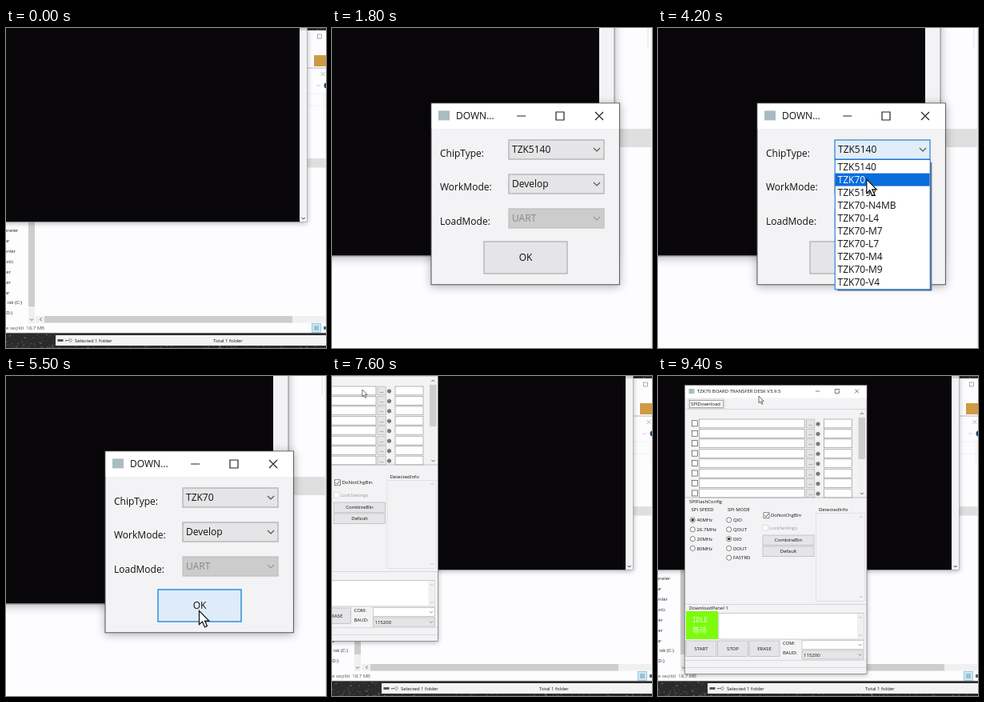
An HTML page for the animation above (9.5 s loop, 400 by 400 pixels).

```html
<!DOCTYPE html>
<html lang="en">
<head>
<meta charset="utf-8">
<title>Flash tool setup</title>
<style>
html, body { margin: 0; width: 100%; height: 100%; overflow: hidden; background: #fdfcff; }
svg { display: block; width: 100vw; height: 100vh; }
text { font: 6px "Open Sans", "Noto Sans", sans-serif; white-space: pre; }
.shadow { filter: drop-shadow(.5px 1px 3px rgba(0, 0, 0, .3)); }
.status { font: 8px "DejaVu Sans Mono", monospace; }
.status-cjk { font: 9px "Noto Sans CJK SC", "Noto Sans CJK", sans-serif; }
</style>
</head>
<body>
<svg id="stage" viewBox="0 0 400 400"></svg>
<script>
const LOOP = 9500, STEP = 100;
const FACE = "#f3f2f4", BUTTON = "#e5e4e6", BLUE = "#0a6cdc";
const stage = document.getElementById("stage");

// Drawing helpers, all returning SVG markup
const rect = (x, y, w, h, fill, stroke = "none", line = .6) =>
  `<rect x="${x}" y="${y}" width="${w}" height="${h}" fill="${fill}" stroke="${stroke}" stroke-width="${line}"/>`;
const label = (x, y, text, fill = "#111", anchor = "start", style = "") =>
  `<text x="${x}" y="${y + 2.1}" fill="${fill}" text-anchor="${anchor}" class="${style}">${text}</text>`;
const path = (d, stroke = "#333", line = .7, fill = "none") =>
  `<path d="${d}" stroke="${stroke}" stroke-width="${line}" fill="${fill}"/>`;
const circle = (x, y, r, fill, stroke = "none", line = .6) =>
  `<circle cx="${x}" cy="${y}" r="${r}" fill="${fill}" stroke="${stroke}" stroke-width="${line}"/>`;
const chevron = (x, y, dir = 1, color = "#444", line = .8) =>
  path(`M${x - 2} ${y - dir}l2 ${2 * dir}l2 ${-2 * dir}`, color, line);
const group = (content, attributes) => `<g ${attributes}>${content}</g>`;
const repeat = (n, fn) => Array.from({ length: n }, (_, i) => fn(i)).join("");

const button = (x, y, w, h, text, hot = false) =>
  rect(x, y, w, h, hot ? "#deecfa" : BUTTON, hot ? "#0078d7" : "#adadad") +
  label(x + w / 2, y + h / 2, text, "#111", "middle");

const combo = (x, y, w, h, text, { fill = BUTTON, stroke = "#adadad", ink = "#111" } = {}) =>
  rect(x, y, w, h, fill, stroke) + label(x + 2, y + h / 2, text, ink) +
  chevron(x + w - 4.5, y + h / 2, 1, ink === "#111" ? "#555" : "#999", .6);

const windowButtons = (min, max, close, y) => path(
  `M${min - 2.7} ${y}h5.5M${max - 2.6} ${y - 2.5}h5v5h-5zM${close - 2.5} ${y - 2.5}l5 5m0 -5l-5 5`, "#222", .6);

const checkbox = (x, y, size, checked, color = "#333") =>
  rect(x, y, size, size, "#fff", color) +
  (checked ? path(`M${x + 1.3} ${y + size / 2}l1.8 1.9l2.8 -4`, color, .8) : "");

const radios = (x, names, chosen) => names.map((name, i) => {
  const y = 180 + i * 11.8;
  return circle(x, y, 3.1, "#fff", "#333") + (i === chosen ? circle(x, y, 1.7, "#222") : "") +
    label(x + 5.3, y, name);
}).join("");

// Motion helpers
const clamp = p => Math.min(1, Math.max(0, p));
const span = (t, from, to) => clamp((t - from) / (to - from));
const smooth = p => p * p * (3 - 2 * p);
const easeOut = p => 1 - (1 - p) ** 3;

function track(keys, t) {
  const next = keys.findIndex(key => key[0] > t);
  if (next === 0) return keys[0].slice(1);
  if (next < 0) return keys.at(-1).slice(1);
  const [t0, x0, y0] = keys[next - 1], [t1, x1, y1] = keys[next];
  const p = easeOut((t - t0) / (t1 - t0));
  return [x0 + (x1 - x0) * p, y0 + (y1 - y0) * p];
}

function stone() {
  let seed = 7;
  const random = () => (seed = seed * 16807 % 2147483647) / 2147483647;
  const streak = (x, y) => {
    const v = 30 + random() * 110 | 0;
    return path(`M${x} ${y}l${random() * 4 - 1} ${random() * 4 - 2}`, `rgb(${v},${v},${v})`, .8);
  };
  return rect(0, 0, 400, 400, "#2b2b2b") +
    repeat(70, () => streak(random() * 62, 381 + random() * 19)) +
    repeat(100, () => streak(random() * 400, 397 + random() * 3)) +
    repeat(12, () => streak(376 + random() * 24, random() * 3));
}

function desktop() {
  const places = [["sneler", 15.5], ["ar", 4.5], ["enler", 12], ["stü", 9], ["er", 6], ["er", 6],
    ["ar", 4.5], ["isk (C:)", 20], ["D:)", 8]];
  const backWindow =
    rect(376, 3, 24, 47, "#fdfcff") + rect(389.3, 8, 5, 5, "none", "#777") +
    rect(385, 34, 15, 14, "#cf9a45");
  const explorer =
    rect(0, 50, 400, 331, "#fdfcff") + path("M376 50H400", "#999") +
    path("M393.5 55l5 5m0 -5l-5 5", "#888", .6) +
    chevron(390.5, 72, 1, "#d8a0a0", .7) + circle(401, 72, 3.5, "#174a70") +
    path("M376 82H400M376 97H400M397.5 82V113", "#e4e2e5", .5) +
    rect(376, 163, 24, 11.5, "#e0dfe0") +
    path("M399.6 80V360", "#e8e8d8", .6) +
    label(7, 240, "ay", "#222", "end") +
    places.map(([name, end], i) => label(end, 253 + i * 12.9, name, "#222", "end")).join("") +
    rect(28, 240, 8, 129, "#f0f0f0") + rect(28, 240, 8, 108, "#cdcdcd") + chevron(32, 364.5) +
    rect(37, 360, 363, 8.5, "#f0f0f0") + rect(48, 360, 310, 8.5, "#cdcdcd") +
    path("M44.5 362.2l-2 2l2 2", "#444", .8) +
    label(0, 375, "e seçildi  18,7 MB", "#555") +
    rect(382.5, 369.5, 11, 11, "#cce8f5", "#67b3d6") +
    path("M385 373h6M385 375h6M385 377h6", "#4d7585", .7) +
    rect(397, 373, 3, 4, "#52636d") + path("M0 381.3H400", "#aaa", .6);
  const statusBar =
    rect(62, 384, 338, 13, FACE) + rect(64.5, 389, 7, 3, "#555") +
    path("M74 390.5h5M75 390.5v1.5", "#777", 1) + circle(80.5, 390.5, 1.8, "none", "#777", .8) +
    label(86, 391, "Selected 1 folder") + label(259, 391, "Total 1 folder");
  const terminal = group(
    rect(-5, -5, 381.5, 247.5, "#f3f2f4", "#888", .5) + rect(-5, -5, 372, 247.2, "#09070a") +
    rect(367, -2, 9, 5, "#cdcdcd") + chevron(371.7, 238, 1, "#333", 1), 'class="shadow"');
  return stone() + backWindow + explorer + statusBar + terminal;
}

const CHIPS = ["TZK5140", "TZK70", "TZK5192", "TZK70-N4MB", "TZK70-L4", "TZK70-M7",
  "TZK70-L7", "TZK70-M4", "TZK70-M9", "TZK70-V4"];

function chipList(t) {
  const shift = t < 3100 ? -82 : t < 3200 ? -35.5 : 0;
  const active = t < 3700 ? 0 : 1;
  const rows = CHIPS.map((chip, i) => {
    const y = 183 + i * 8;
    return (i === active ? rect(310.8, y - .2, 59, 8, BLUE) : "") +
      label(312.3, y + 3.7, chip, i === active ? "#fff" : "#111");
  }).join("");
  const list = rect(312, 184, 59.2, 80.3, "#777") +
    rect(310.6, 182.2, 59.5, 81.2, "#fff", shift ? "#666" : BLUE, .5) + rows;
  return '<clipPath id="below"><path d="M300 182h100v100h-100z"/></clipPath>' +
    group(group(list, `transform="translate(0 ${shift})"`), 'clip-path="url(#below)"');
}

function dialog(t) {
  const open = t >= 3000 && t < 4600;
  const hotCombo = t >= 2700 && t < 5200;
  const appear = t < 1400 ? .6 : 1;
  const size = t < 1400 ? .94 : 1;
  const content =
    rect(262, 147, 117.7, 113.4, FACE, "#555", .5) + rect(262.3, 147.3, 117.1, 15.7, "#fff") +
    rect(266.5, 151.7, 7, 6, "#a9bcc0") + label(277.5, 155, "DOWN...") +
    windowButtons(318.3, 342.6, 367, 155) +
    label(267.5, 178.2, "ChipType:") + label(267.5, 199.6, "WorkMode:") + label(267.5, 221, "LoadMode:") +
    combo(310.5, 170, 59.5, 12, CHIPS[t < 4600 ? 0 : 1], hotCombo ? { fill: "#e2edf9", stroke: "#2a80d0" } : {}) +
    combo(310.5, 191.5, 59.5, 12, "Develop") +
    combo(310.5, 213, 59.5, 12, "UART", { fill: "#cccccc", stroke: "#bfbfbf", ink: "#888" }) +
    button(295, 233.5, 52, 20, "OK", t >= 5300);
  return group(content, `class="shadow" opacity="${appear}"
    transform="translate(321 204) scale(${size}) translate(-321 -204)"`) + (open ? chipList(t) : "");
}

function flashTool() {
  const row = i => {
    const y = 54 + i * 12.45;
    return checkbox(42.5, y + 1.8, 7, false) + rect(51.5, y, 132, 10.8, "#fff", "#888") +
      button(185.5, y, 10.3, 10.8, "...") + circle(200, y + 6, 2.2, "#999", "#444") +
      path(`M198.5 ${y + 6}h3`, "#333", .6) + rect(207.5, y, 35, 10.8, "#fff", "#888");
  };
  const files = repeat(8, row) + rect(250.5, 43, 8.5, 108, "#f0f0f0") +
    rect(250.5, 52, 8.5, 52, "#cdcdcd") + chevron(254.8, 47, -1) + chevron(254.8, 147);
  const config =
    path("M34 152H260.5", "#aaa") + label(39, 156.5, "SPIFlashConfig") +
    label(41.5, 167, "SPI SPEED") + label(87, 167, "SPI MODE") +
    radios(43.3, ["40MHz", "26.7MHz", "20MHz", "80MHz"], 0) +
    radios(88.7, ["QIO", "QOUT", "DIO", "DOUT", "FASTRD"], 2) +
    checkbox(132, 170.8, 7, true) + label(141, 174.3, "DoNotChgBin") +
    checkbox(131, 186.5, 6.5, false, "#ccc") + label(139, 190, "LockSettings", "#999") +
    button(131, 199, 64, 12.7, "CombineBin") + button(131, 213, 64, 12.7, "Default") +
    label(201, 166.5, "DetectedInfo") + rect(197.5, 171.5, 61, 110, FACE, "#d8d8d8") +
    chevron(254, 176, -1, "#bbb") + chevron(254, 276, 1, "#bbb");
  const panel =
    path("M34 285.5H260.5", "#ccc") + label(39, 290, "DownloadPanel 1") +
    rect(35, 294, 40, 35, "#7dfb0c") +
    label(43, 306.3, "IDLE", "#d9ffe0", "start", "status") +
    label(43, 319.2, "等待", "#d9ffe0", "start", "status-cjk") +
    rect(76, 296.5, 181, 32.5, "#fff", "#aaa") + rect(249, 297, 8, 31.5, "#f0f0f0") +
    chevron(253, 302, -1, "#bbb") + chevron(253, 324, 1, "#bbb") +
    button(35, 331, 38, 19.5, "START") + button(74.5, 331, 38, 19.5, "STOP") +
    button(114, 331, 38, 19.5, "ERASE") +
    label(156, 334, "COM:") + label(156, 346, "BAUD:") +
    combo(180, 330.5, 77, 11, "", { fill: "#fff" }) + combo(180, 343, 77, 11, "115200") +
    path("M34 355.5H260.5M34 364.5H260.5", "#d0d0d0");
  return group(
    rect(33.5, 11.5, 227.5, 361, FACE, "#777", .7) + rect(34, 12, 226.5, 15.5, "#fff") +
    rect(38.5, 16, 7, 6, "#a9bcc0") + label(49, 19, "TZK70 BOARD TRANSFER DESK V3.9.5") +
    windowButtons(199.5, 224, 248.5, 19) +
    rect(38, 29, 45, 11.5, "#fafafa", "#bbb") + rect(39.7, 30.5, 42, 8.7, "none", "#555", .5) +
    label(41, 35, "SPIDownload") + path("M34 41.5H260.5", "#ccc") +
    files + config + panel, 'class="shadow"');
}

const pointer = (x, y) => group(
  path("M0 0V8.6L2 6.8L3.5 10.2L5 9.5L3.5 6.3H6.2Z", "#111", .6, "#fff"), `transform="translate(${x} ${y})"`);

const POINTER_PATH = [
  [2000, 196, 105], [2800, 325.1, 175.9], [3400, 325.1, 175.9], [4000, 330.4, 194.6],
  [5000, 330.4, 194.6], [5700, 320.5, 248], [7200, 320.5, 248], [8000, -2.5, -16],
  [8600, -2.5, -16], [9300, 126, 25]
];

const DESKTOP = desktop(), TOOL = flashTool();
const clicked = t => [3000, 4500, 7000].some(start => t >= start && t < start + 200);

function render(t) {
  const zoom = smooth(span(t, 0, 500)) - smooth(span(t, 6200, 6700));
  const [x, y] = track(POINTER_PATH, t);
  let scene = DESKTOP;
  if (t >= 1300 && t < 7200) scene += dialog(t);
  if (t >= 7500) {
    const [dx, dy] = t < 8600 ? [-128.5, -41] : [x - 126, y - 25];
    scene += group(TOOL, `transform="translate(${dx} ${dy})"`);
  }
  if (clicked(t)) scene += circle(x, y, 4.2, "rgba(150,140,140,.2)", "rgba(130,105,100,.6)", 1.2);
  if (t >= 2100) scene += pointer(x, y);
  stage.innerHTML = group(scene, `transform="translate(${-400 * zoom} ${-200 * zoom}) scale(${1 + zoom})"`);
}

let shown = -1;
const begin = performance.now();
function tick() {
  const elapsed = (performance.now() - begin) % LOOP;
  const t = Math.floor(elapsed / STEP) * STEP;
  if (t !== shown) render(shown = t);
  requestAnimationFrame(tick);
}
tick();
</script>
</body>
</html>
```
